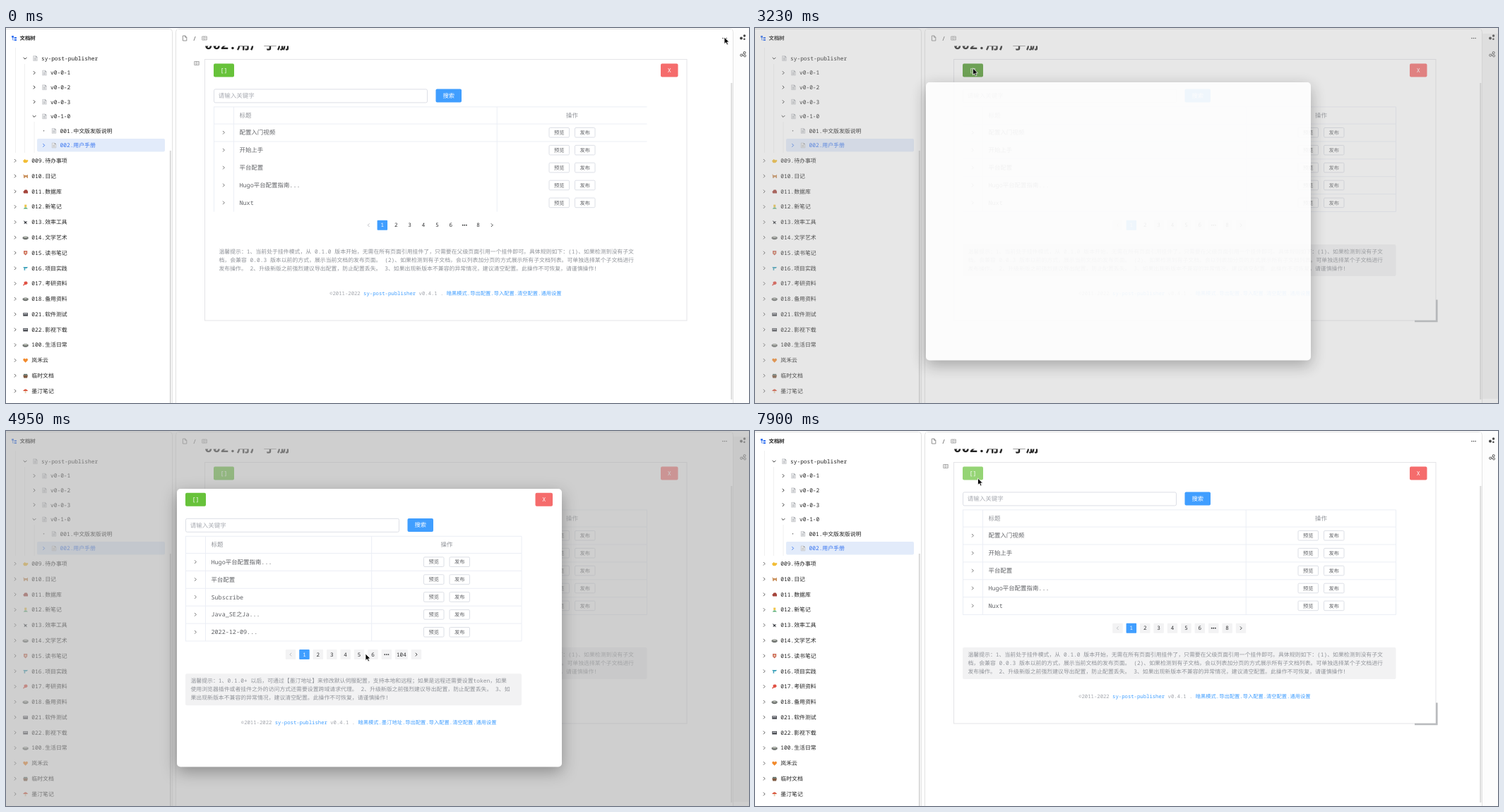
An HTML page for the animation above (8000 ms loop, 1052 by 532 pixels).

```html
<!DOCTYPE html>
<html lang="zh-CN">
<head>
<meta charset="utf-8">
<title>文档树</title>
<style>
html, body { margin: 0; width: 100%; height: 100%; overflow: hidden; background: #fdfdfd; }
svg { display: block; width: 100vw; height: 100vh; }
text {
  font-family: "Noto Sans Mono", "Noto Sans CJK SC", "Noto Sans CJK", monospace;
  text-rendering: geometricPrecision;
}
#dialog { filter: drop-shadow(0 7px 11px rgba(0, 0, 0, .32)); }
#menu { filter: drop-shadow(0 2px 5px rgba(0, 0, 0, .22)); }
</style>
</head>
<body>
<svg id="stage" viewBox="0 0 1052 532"></svg>
<script>
const LOOP = 8000;
const BLUE = '#409eff', GREEN = '#67c23a', RED = '#f56c6c', GRAY = '#909399';
const EDGE = '#dcdfe6', GRID = '#ebeef5', INK = '#303133';

const $ = id => document.getElementById(id);
const rect = (x, y, w, h, fill, r = 0, stroke = 'none', more = '') =>
  `<rect x="${x}" y="${y}" width="${w}" height="${h}" rx="${r}" fill="${fill}" stroke="${stroke}" ${more}/>`;
const line = (d, c = GRID, w = 1) => `<path d="${d}" fill="none" stroke="${c}" stroke-width="${w}"/>`;
const fill = (d, c) => `<path d="${d}" fill="${c}"/>`;
const dot = (x, y, r, c) => `<circle cx="${x}" cy="${y}" r="${r}" fill="${c}"/>`;
const group = (id, body, more = '') => `<g id="${id}" ${more}>${body}</g>`;
const at = (x, y, body) => `<g transform="translate(${x} ${y})">${body}</g>`;
// Text centred vertically on y
const text = (x, y, size, str, c, anchor = 'start', weight = 400) =>
  `<text x="${x}" y="${y + size * .36}" font-size="${size}" fill="${c}" text-anchor="${anchor}" font-weight="${weight}">${str}</text>`;
const chevron = (x, y, dir, c = '#555', s = 2.3) => line(
  dir === 'down' ? `M${x - s} ${y - s / 2}l${s} ${s}l${s} ${-s}`
    : dir === 'left' ? `M${x + s / 2} ${y - s}l${-s} ${s}l${s} ${s}`
    : `M${x - s / 2} ${y - s}l${s} ${s}l${-s} ${s}`, c, .9);

const docIcon = (x, y) => at(x, y,
  fill('M-2.8-3.4H1.2L3-1.6V3.6H-2.8Z', '#e6e7e9') + line('M-2.6-3.4H1.2L3-1.6V3.5H-2.6Z', '#b4b7bb', .5) +
  fill('M1-3.4V-1.4H3Z', '#85898e') + line('M-1.4.2H1.6M-1.4 1.8H1.6', '#a3a6aa', .6));
const blockIcon = (x, y) => at(x, y,
  line('M-3.3-2.5H3.3V2.5H-3.3ZM-.6-2.5V2.5M.8-.9H2.4M.8.8H2.4M-2.5 0h1', '#888', .7));

const bowl = [['M0 3.5Q4 1 8 3.5V5.5Q4 8.5 0 5.5Z', '#6f7370'], ['M1 3.8Q4 2.4 7 3.8Q4 5 1 3.8Z', '#dfe4d5']];
const card = [['M.6 2H7.4V6.6H.6Z', '#4d4f55'], ['M1.4 3H6.6V4H1.4Z', '#d7d9de']];
const tree = [
  ['009.待办事项', [['M.4 4.2L3 1.6L4.5 3H7.6V4.6L5.4 7H2Z', '#f2bd35']]],
  ['010.日记', [['M1 1L2.6 3H6L7.4 1.6V6.8H6V5.4H3V7H1.6Z', '#c9905b']]],
  ['011.数据库', [['M1 4.5L3 1.6H6L7.4 4V6.6H1.6Z', '#a5443b']]],
  ['012.新笔记', [['M1 6.8Q4 3 7.4 6.8Z', '#55ac72'], ['M2.6 1H5.6V4.4H2.6Z', '#eec64b']]],
  ['013.效率工具', [['M1 1.6L4 3.4L6.6 2.6L5 4.6L6.6 7L4 5.6L1.8 6.8L2.8 4.4Z', '#3d4046']]],
  ['014.文学艺术', bowl],
  ['015.读书笔记', [['M1.4 1H6.6V5L4 7.6L1.4 5Z', '#cf6c5b'], ['M3 2.4H5V5H3Z', '#e9d8b5']]],
  ['016.项目实践', [['M.6 2.2H7.4L6 4.2H3.6V7H2V4.2Z', '#46a6bd']]],
  ['017.考研资料', [['M2 1.6Q7-.4 7 4Q5 6.6 3 5.4L1.4 7.2L.4 6.2L2 4.4Z', '#e05245']]],
  ['018.备用资料', bowl],
  ['021.软件测试', card],
  ['022.影视下载', card],
  ['100.生活日常', bowl],
  ['岚禾云', [['M4 7.2L.8 4Q.4 1 2.6 1.2L4 2.4L5.4 1.2Q7.6 1 7.2 4Z', '#f28a2c']]],
  ['临时文档', [['M.6 3.4H7.4L6.4 7.2H1.6Z', '#7f5a41'], ['M1.4 1.6H6.6V3.4H1.4Z', '#5b6f66']]],
  ['墨汀笔记', [['M.4 4Q4-1.4 7.6 4Z', '#d9573f'], ['M3 4H5V7.2H3Z', '#e6cfae']]]
];

function sidebar() {
  const S = 7.87, C = '#222';
  let s = rect(-6, 1.5, 241.5, 540, '#fff', 4, '#e2e2e2') +
    fill('M8 11h3v2.4H8zM12 13h3v2h-3zM12 16h3v2h-3z', '#3573f0') + line('M9.5 13V17H12M9.5 14H12', '#3573f0', .7) +
    text(19.5, 14.5, 7.4, '文档树', C, 'start', 700) +
    line('M13.5 28V177M26.5 51V177M40 133V177', '#ececec', .8) +
    rect(231.8, 174, 2, 358, '#d9d9d9') + rect(44, 157, 181, 18.5, '#e2ebfa', 2);
  const nodes = [
    [27, 'sy-post-publisher', 'down'], [40, 'v0-0-1'], [40, 'v0-0-2'], [40, 'v0-0-3'],
    [40, 'v0-1-0', 'down'], [53.5, '001.中文版发版说明', 'dot'], [53.5, '002.用户手册']
  ];
  nodes.forEach(([x, name, mark], i) => {
    const y = 43 + i * 20.57, c = i === 6 ? '#3573f0' : C;
    s += (mark === 'dot' ? dot(x, y, .8, '#777') : chevron(x, y, mark, c)) +
      docIcon(x + 14.3, y) + text(x + 23, y, S, name, c);
  });
  tree.forEach(([name, art], i) => {
    const y = 188.3 + i * 21.78;
    s += chevron(13, y, 'right') + at(23.6, y - 4, art.map(a => fill(...a)).join('')) + text(36.3, y, S, name, C);
  });
  return s;
}

function editor() {
  return rect(240.5, 1.5, 789, 540, '#fff', 4, '#e2e2e2') +
    `<text x="281" y="30" font-size="19" font-weight="700" fill="#222">002.用户手册</text>` +
    rect(242, 2, 786, 23.5, '#fff') +
    at(253, 14.5, line('M-2.6-3.5H.6L2.8-1.3V3.5H-2.6ZM.6-3.5V-1.3H2.8', '#777', .8)) +
    text(267, 14.5, 8.5, '/', '#555', 'middle') + blockIcon(281, 14.5) +
    [-2.6, 0, 2.6].map(d => dot(1017.5 + d, 14.5, .8, '#444')).join('') +
    rect(281.5, 44.5, 682.5, 370.5, '#fff', 0, '#e4e4e7') +
    rect(1026.3, 78, 2, 449, '#dadada');
}

const dock = () =>
  dot(1041, 14.5, 2, '#444') + dot(1045.6, 11, 1.7, '#444') + dot(1045.4, 15.8, 1.3, '#444') +
  at(1043.5, 37, line('M-1.4 1L1.4-1.4M-1.2 2H1.4', '#444', .8) +
    [[-2.4, 1.6], [2.2, -2], [2.6, 2.4]].map(([x, y]) =>
      `<circle cx="${x}" cy="${y}" r="1.5" fill="#fff" stroke="#444" stroke-width=".9"/>`).join(''));

function widget(id, x, y, W, o) {
  const button = (bx, by, w, c, label, key = '') =>
    rect(bx, by, w, 19, c, 2, 'none', key) + text(bx + w / 2, by + 9.5, 8.3, label, '#fff', 'middle');
  const top = y + 61.5, bottom = top + 148.7, right = x + W, col = right - 212.3;
  const rowY = i => top + 24.2 + i * 24.9;

  let s = button(x, y, 29, GREEN, '[]', `id="${id}Green"`) + button(right + 19.5, y, 24.5, RED, 'X') +
    rect(x + .5, y + 36.5, 302, 19, '#fff', 2, EDGE) + text(x + 6.8, y + 46, 8.5, '请输入关键字', '#a8abb2') +
    button(x + 314.5, y + 36.2, 36.5, BLUE, '搜索') +
    line(`M${x} ${top}H${right}M${x} ${rowY(0)}H${right}M${x} ${rowY(1)}H${right}` +
      `M${x + .5} ${top}V${bottom}M${x + 28.5} ${top}V${bottom}M${col} ${top}V${bottom}`) +
    text(x + 36.5, top + 12, 8.45, '标题', GRAY) + text(right - 106, top + 12, 8.45, '操作', GRAY, 'middle');

  let soft = line([2, 3, 4, 5].map(i => `M${x} ${rowY(i)}H${right}`).join('') + `M${right} ${top}V${bottom}`) +
    rect(x, y + 256.5, W, 45, '#f2f2f3', 2);

  const rows = o.rows.map((name, i) => {
    const c = rowY(i) + 12.2;
    const small = (bx, label) => rect(bx, c - 6.8, 28.5, 13.6, '#fff', 1.5, EDGE) +
      text(bx + 14.25, c, 7.3, label, '#606266', 'middle');
    return chevron(x + 14.2, c, 'right', '#666') + text(x + 36.5, c, 8.45, name, '#606266') +
      small(right - 138.5, '预览') + small(right - 102, '发布');
  }).join('');

  const pages = ['<', 1, 2, 3, 4, 5, 6, '…', o.last, '>'];
  const wide = p => p > 99 ? 17.8 : 14.5;
  let px = x + W / 2 - (pages.reduce((a, p) => a + wide(p), 0) + 9 * 4.9) / 2;
  const py = y + 229.3;
  let pager = '';
  for (const p of pages) {
    const w = wide(p), c = px + w / 2, bg = rect(px, py - 7, w, 14, p === 1 ? BLUE : '#f3f3f4', 1);
    if (p === 1) pager += bg; else soft += bg;
    pager += p === '<' ? chevron(c, py, 'left', '#b5b8be')
      : p === '>' ? chevron(c, py, 'right', INK)
      : p === '…' ? [-2.6, 0, 2.6].map(d => dot(c + d, py, .9, INK)).join('')
      : text(c, py, 7.6, p, p === 1 ? '#fff' : INK, 'middle', 500);
    px += w + 4.9;
  }

  s += group(id + 'Soft', soft) + pager + group(id + 'Rows', rows) +
    o.note.map((n, i) => text(x + 7.5, y + 266.7 + i * 12, 7.88, n, GRAY)).join('');
  const fx = x + W / 2 + 22 - o.half, fy = y + 325.5;
  return s + text(fx, fy, 7.28, `©2011-2022 <tspan fill="${BLUE}" font-weight="500">sy-post-publisher</tspan> v0.4.1 . ` +
    `<tspan fill="${BLUE}">${o.links}</tspan>`, '#a3a6ad');
}

const pageWidget = widget('page', 294, 50.4, 613.5, {
  rows: ['配置入门视频', '开始上手', '平台配置', 'Hugo平台配置指南...', 'Nuxt'],
  last: 8, half: 164.6,
  note: [
    '温馨提示：1、当前处于挂件模式，从 0.1.0 版本开始，无需在所有页面引用挂件了，只需要在父级页面引用一个挂件即可。具体规则如下：(1)、如果检测到没有子文',
    '档，会兼容 0.0.3 版本以前的方式，展示当前文档的发布页面。 (2)、如果检测到有子文档，会以列表加分页的方式展示所有子文档列表。可单独选择某个子文档进行',
    '发布操作。 2、升级新版之前强烈建议导出配置，防止配置丢失。 3、如果出现新版本不兼容的异常情况，建议清空配置。此操作不可恢复，请谨慎操作!'
  ],
  links: '暗黑模式.导出配置.导入配置.清空配置.通用设置'
});
const dialogWidget = widget('dlg', 254, 87.8, 476, {
  rows: ['Hugo平台配置指南...', '平台配置', 'Subscribe', 'Java_SE之Ja...', '2022-12-09...'],
  last: 104, half: 181.2,
  note: [
    '温馨提示：1、0.1.0+ 以后，可通过【墨汀地址】来修改默认伺服配置，支持本地和远程；如果是远程还需要设置token，如果',
    '使用浏览器插件或者挂件之外的访问方式还需要设置跨域请求代理。 2、升级新版之前强烈建议导出配置，防止配置丢失。 3、如',
    '果出现新版本不兼容的异常情况，建议清空配置。此操作不可恢复，请谨慎操作!'
  ],
  links: '暗黑模式.墨汀地址.导出配置.导入配置.清空配置.通用设置'
});

const menuItems = [
  [25.5, '插入图片或文件', 'M0-3V1M-1.6-1.4L0-3L1.6-1.4M-2.8 2.6H2.8'],
  [43.7, '开始录音', 'M-1-3H1V.6H-1ZM-2.4-.4Q0 3.6 2.4-.4M0 1.6V3'],
  [61.9, '上传资源文件到图床', 'M-2 2Q-4 0-1.8-.8Q0-3.6 1.8-.8Q4 0 2 2Z'],
  [80, '网络图片转换为本地图片', 'M-2-3.2V2H3.2M-3.2-2H2V3.2'],
  [98.2, '优化排版', 'M-2.6-3H2.4V-.8H-2.6ZM2.4-2H3.2V.4H0V3.2'],
  [120.7, '刷新', 'M-2.6.4Q-2.4-2.6 1-2.4M2.6-.4Q2.4 2.6-1 2.4M0-3.4L1.2-2.4L0-1.4M0 3.4L-1.2 2.4L0 1.4', 'F5'],
  [138.8, '全屏切换', 'M-2.8 2.8L2.8-2.8M.6-2.8H2.8V-.6M-.6 2.8H-2.8V.6', '⌥Y'],
  [157, '模式切换', 'M-2.8 2.8L-2 .6L1.6-3L3-1.6L-.6 2Z', '>'],
  [175, '导出', 'M-1-2.6H-2.8V2.8H2.8V1M-.8.6Q0-2 3-1.8M1.6-3.2L3-1.8L1.6-.4', '>']
];
const menu = rect(942.5, 14, 120, 244, '#fff', 3, '#e4e4e4') +
  rect(947, 0, 110, 17.4, '#f0f0f1', 2, 'none', 'id="hover"') +
  line('M943 109.5H1052M943 187H1052', '#e6e6e6') +
  menuItems.map(([y, label, d, key]) => at(954, y, line(d, '#555', .8)) + text(962, y, 7.86, label, '#222') +
    (key === '>' ? chevron(1045.5, y, 'right') : key ? text(1049, y, 7.2, key, '#aaa', 'end') : '')).join('') +
  ['字数', '词数', '链接', '图片', '引用'].map((label, i) =>
    text(951, 198.5 + i * 12.1, 7.3, label, '#999') + text(1048.5, 198.5 + i * 12.1, 7.3, '0', '#999', 'end')).join('');

$('stage').innerHTML = rect(0, 0, 1052, 532, '#fdfdfd') + sidebar() + editor() +
  group('block', blockIcon(270, 50)) + group('page', pageWidget) +
  group('handle', line('M934 416H965.3V385.5', '#b9bbbe', 2.6)) +
  group('caret', line('M281.5 432.5V444', '#333', 1)) +
  rect(1030, 8, 22, 518, '#f2f2f2', 0, 'none', 'id="dockBg"') + dock() +
  rect(0, 0, 1052, 532, '#afafaf', 0, 'none', 'id="mask"') +
  group('dialog', rect(242, 82, 545, 394.5, '#fff', 5, 'none', 'id="sheet"') + group('inner', dialogWidget)) +
  group('menu', menu) +
  group('arrow', '<path d="M0 0V9.6L2.3 7.5L3.8 10.9L5.5 10.2L4 6.9H7Z" fill="#000" stroke="#fff" stroke-width=".8"/>') +
  group('beam', line('M-2-5Q0-5 0-4Q0-5 2-5M0-4V4M-2 5Q0 5 0 4Q0 5 2 5M-1 1.5H1', '#222', .9));

const spans = [
  [170, 1080, 7], [1230, 2190, 7], [2340, 2780, 4], [3080, 3380, 3], [3560, 4070, 4],
  [4220, 4950, 6], [5100, 5250, 2], [5550, 6590, 8], [6740, 7180, 4], [7420, 7750, 3], [7900, 7900, 1]
];
const ticks = [0];
for (const [a, b, n] of spans)
  for (let i = 0; i < n; i++) ticks.push(n > 1 ? Math.round(a + (b - a) * i / (n - 1)) : a);

const path = [
  [0, 1017, 13], [322, 1017, 14], [625, 1006, 42], [928, 985, 108], [1080, 982.5, 124], [1230, 978, 124],
  [2030, 335, 82], [2340, 312.5, 65.5], [2780, 308.5, 57], [3560, 308.5, 57], [4070, 410, 220],
  [4950, 509, 316], [5250, 505, 319], [5550, 507, 317], [6590, 729, 123], [6887, 757, 96],
  [7180, 747, 104], [7750, 338, 67], [7900, 315.5, 67]
];
const mix = (a, b, k) => a + (b - a) * k;
function along(keys, t) {
  const i = keys.findIndex(k => k[0] > t);
  if (i < 0) return keys[keys.length - 1].slice(1);
  const a = keys[i - 1], b = keys[i];
  const k = (t - a[0]) / (b[0] - a[0]), e = k * k * (3 - 2 * k);
  return a.slice(1).map((v, j) => mix(v, b[j + 1], e));
}
// Mask alpha, dialog alpha, dialog shift
const fade = [
  [0, 0, 0, -6], [2930, 0, 0, -6], [3230, .3, .9, -5], [3380, .4, 1, -3.8], [3730, .6, 1, 0], [6887, .6, 1, 0],
  [7180, .4, .86, -3.8], [7500, 0, 0, -5], [LOOP, 0, 0, -5]
];

const show = (id, on) => $(id).setAttribute('visibility', on ? 'inherit' : 'hidden');
const set = (id, key, v) => $(id).setAttribute(key, v);

function draw(t) {
  const [x, y] = along(path, t), within = (a, b) => t >= a && t < b;
  const [mask, alpha, shift] = along(fade, t);

  const beam = within(1000, 1230);
  show('beam', beam);
  show('arrow', !beam);
  set(beam ? 'beam' : 'arrow', 'transform', `translate(${x} ${y})`);

  show('menu', within(450, 1230));
  const item = menuItems.find(m => Math.abs(m[0] - y) < 9.1);
  show('hover', within(450, 1230) && item);
  if (item) set('hover', 'y', item[0] - 8.7);
  show('dockBg', within(450, 7420));
  set('dockBg', 'height', t < 1230 ? 258 : 518);

  show('block', t < 1230 || t >= 7420);
  show('page', !within(1390, 1710));
  show('pageRows', !within(1390, 1870));
  show('pageSoft', t >= 1710);
  show('handle', within(1870, 3900) || t >= 7420);
  show('caret', within(2030, 2630));
  set('pageGreen', 'fill', within(2780, 3560) ? '#529b2e' : within(2480, 2780) || t >= 7750 ? '#95d475' : GREEN);

  set('mask', 'opacity', mask);
  show('dialog', alpha > 0);
  set('dialog', 'opacity', alpha);
  set('dialog', 'transform', `translate(0 ${shift})`);
  set('sheet', 'fill', t < 7000 ? '#fff' : '#f5f5f5');
  show('inner', within(4220, 7000));
  show('dlgRows', within(4360, 7000));
}

function frame() {
  const t = performance.now() % LOOP;
  draw(ticks.filter(k => k <= t).pop());
  requestAnimationFrame(frame);
}
frame();
</script>
</body>
</html>
```
